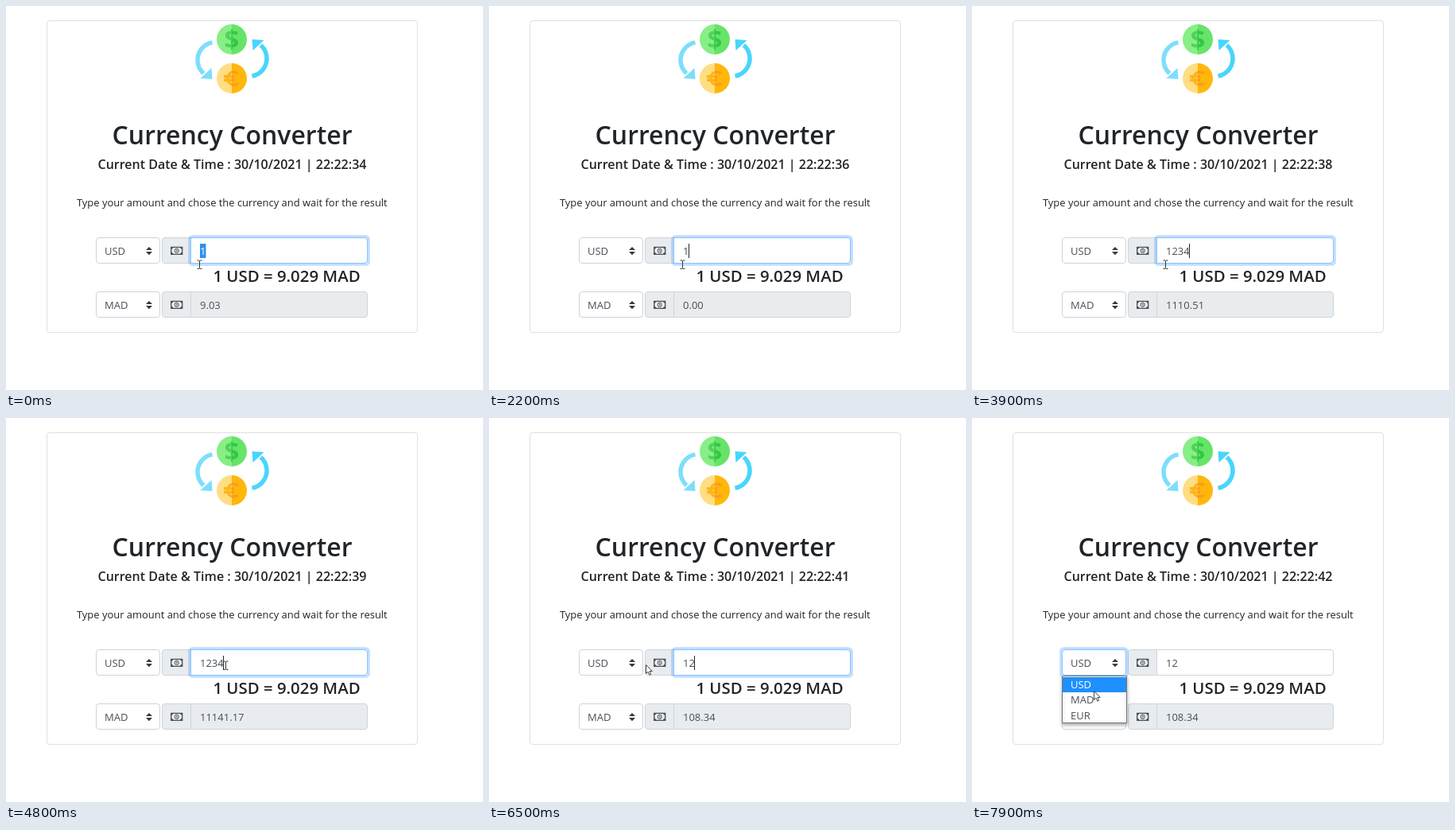
Recreate the animation shown at these times as an HTML page with a canvas. Size 600 px wide and 483 px high, loop 8 s.

```html
<!DOCTYPE html>
<html lang="en">
<head>
<meta charset="utf-8">
<title>Currency Converter</title>
<style>
  html, body { margin: 0; width: 600px; height: 483px; overflow: hidden; background: #fff; }
  canvas { display: block; }
</style>
</head>
<body>
<canvas id="stage" width="600" height="483"></canvas>
<script>
const ctx = document.getElementById('stage').getContext('2d');
const LOOP = 8000, RATE = 9.0285, REPLY_DELAY = 400, BLINK = 530;
const INK = '#212529', FIELD = '#495057', BORDER = '#ced4da', GREY = '#e9ecef';

const CLEAR = 1300, DRAG = 4700, RETYPE = 6100, BLUR = 7400, OPEN = 7500;
const presses = [2200, 3300, 3500, 3900];
// Pointer moves: start, end, and where they lead.
const glides = [[4300, DRAG, 280, 311], [DRAG, 5500, 197, 310], [6900, BLUR, 155, 318], [OPEN, 7900, 153, 343]];

const clamp = v => Math.max(0, Math.min(1, v));
const ease = k => k * k * (3 - 2 * k);

function typedAt(t) {
  if (t < CLEAR) return '1';
  if (t >= RETYPE) return '12';
  return '1234'.slice(0, presses.filter(p => p <= t).length);
}

function mouseAt(t) {
  return glides.reduce(([x, y], [start, end, toX, toY]) => {
    const k = ease(clamp((t - start) / (end - start)));
    return [x + (toX - x) * k, y + (toY - y) * k];
  }, [243, 325]);
}

// The caret blinks from the latest key press or click.
function caretShown(t) {
  const last = Math.max(...[CLEAR, ...presses, DRAG, RETYPE].filter(e => e <= t));
  return t < BLUR && Math.floor((t - last) / BLINK) % 2 === 0;
}

function text(str, x, y, { size = 13, weight = 400, color = FIELD, align = 'left' } = {}) {
  ctx.font = `${weight} ${size}px "Open Sans", "Noto Sans", sans-serif`;
  ctx.textAlign = align;
  ctx.fillStyle = color;
  ctx.fillText(str, x, y);
}

function box(x, y, w, h, fill, radii = 3.5, stroke = BORDER) {
  ctx.beginPath();
  ctx.roundRect(x + .5, y + .5, w, h, radii);
  ctx.fillStyle = fill;
  ctx.fill();
  ctx.lineWidth = 1;
  ctx.strokeStyle = stroke;
  ctx.stroke();
}

function focusRing(x, y, w, h, radii, amount) {
  if (!amount) return;
  ctx.save();
  ctx.globalAlpha = amount;
  box(x, y, w, h, 'transparent', radii, '#8cc3ff');
  ctx.globalAlpha = amount * amount * .25;
  ctx.beginPath();
  ctx.roundRect(x - 1.4, y - 1.4, w + 3.8, h + 3.8, 4);
  ctx.lineWidth = 2.8;
  ctx.strokeStyle = '#007bff';
  ctx.stroke();
  ctx.restore();
}

function path(d, x, y, fill, stroke, width = 1) {
  const p = new Path2D(d);
  ctx.save();
  ctx.translate(x, y);
  if (fill) { ctx.fillStyle = fill; ctx.fill(p); }
  if (stroke) { ctx.strokeStyle = stroke; ctx.lineWidth = width; ctx.stroke(p); }
  ctx.restore();
}

// Hard two-tone fill that changes at the given x.
function split(left, right, x) {
  const g = ctx.createLinearGradient(x - 20, 0, x + 20, 0);
  [[0, left], [.5, left], [.5, right], [1, right]].forEach(stop => g.addColorStop(...stop));
  return g;
}

function coin(y, left, right) {
  ctx.beginPath();
  ctx.arc(284, y, 19, 0, Math.PI * 2);
  ctx.fillStyle = split(left, right, 284);
  ctx.fill();
}

function swapArrow(color, angle) {
  ctx.save();
  ctx.translate(284.5, 67);
  ctx.rotate(angle);
  ctx.beginPath();
  ctx.arc(-21, 1, 22.5, -1.75, 2.3, true);
  ctx.lineWidth = 5.5;
  ctx.strokeStyle = color;
  ctx.stroke();
  path('M-40 24L-25 25L-26 11Z', 0, 0, color);
  ctx.restore();
}

function icon() {
  swapArrow('#7ddefb', 0);
  swapArrow('#48d5fd', Math.PI);
  coin(42, '#88ee86', '#66e468');
  text('$', 284, 54, { size: 33, weight: 700, color: split('#4fd35a', '#33c747', 284), align: 'center' });
  coin(91, '#ffdd83', '#ffb70a');
  path('M7 -6A8 8 0 1 0 7 6M-11 -2.3H2M-11 2.3H2', 285, 91, null, split('#ffb41a', '#ff9a20', -1), 3.6);
}

function select(y, label) {
  box(113, y, 80, 32, '#fff');
  text(label, 124, y + 22);
  path('M0 -5L-4 -.9H4ZM0 5.2L-4 1.1H4Z', 180, y + 17, '#343a40');
}

function moneyField(y, fill) {
  box(196, y, 36, 32, GREY, [3.5, 0, 0, 3.5]);
  box(232, y, 222, 32, fill, [0, 3.5, 3.5, 0]);
  path('M-7 -4.5H7V4.5H-7ZM-7 -2L-4.5 -4.5M7 -2L4.5 -4.5M-7 2L-4.5 4.5M7 2L4.5 4.5', 214.7, y + 16.8, null, FIELD, 1.3);
  path('M0 -2.8A2.5 2.8 0 1 1 0 2.8A2.5 2.8 0 1 1 0 -2.8M-.8 -1H.2V1.5', 214.7, y + 16.8, null, FIELD);
}

function amountText(t, mouseX) {
  const value = typedAt(t), left = 244;
  if (value) text(value, left, 313);
  else text('Type the amount of your current', left, 313, { color: '#6c757d' });

  const end = left + ctx.measureText(value).width;
  const selecting = t < CLEAR || t >= DRAG && t < RETYPE;
  const from = Math.round(clamp((mouseX - left) / (end - left)) * value.length);
  if (selecting && from < value.length) {
    const start = left + ctx.measureText(value.slice(0, from)).width;
    ctx.fillStyle = '#2f8fee';
    ctx.fillRect(start, 299, end - start, 18);
    text(value.slice(from), start, 313, { color: '#fff' });
  } else if (caretShown(t)) {
    ctx.fillStyle = INK;
    ctx.fillRect(Math.floor(end), 299, 1, 18);
  }
}

function dropdown() {
  ctx.save();
  ctx.shadowColor = 'rgba(0,0,0,.3)';
  ctx.shadowBlur = 4;
  ctx.shadowOffsetY = 2;
  box(113, 324, 81, 59, '#fff', 0, '#767676');
  ctx.restore();
  ctx.fillStyle = '#1e90ff';
  ctx.fillRect(114, 326, 80, 19);
  ['USD', 'MAD', 'EUR'].forEach((name, i) =>
    text(name, 124, 340 + Math.round(i * 19.3), { color: i ? FIELD : '#fff' }));
}

// An I-beam over the amount, an arrow elsewhere.
function pointer(x, y) {
  if (x >= 232) path('M-2.5 -5H-.5L.5 -4.5L1.5 -5H3.5M.5 -4.5V5M-2.5 5.5H-.5L.5 5L1.5 5.5H3.5', x, y, null, '#333');
  else path('M.5 .5V11.5L3 9.2L4.8 13.2L6.6 12.4L4.9 8.5H8.3Z', x, y, '#fff', '#444');
}

function draw(t) {
  const [mouseX, mouseY] = mouseAt(t).map(Math.round);
  const heading = { weight: 600, color: INK, align: 'center' };
  const seconds = 34 + Math.floor((t + 600) / 1000);
  const reply = typedAt(t - REPLY_DELAY) * RATE;

  ctx.fillStyle = '#fff';
  ctx.fillRect(0, 0, 600, 483);
  box(51, 18, 466, 392, '#fff', 3.5, '#e0e0e0');
  icon();

  text('Currency Converter', 284.5, 174, { ...heading, size: 32 });
  text(`Current Date & Time : 30/10/2021 | 22:22:${seconds}`, 284.5, 205, { ...heading, size: 16.05 });
  text('Type your amount and chose the currency and wait for the result', 284.3, 252,
    { size: 12.95, color: INK, align: 'center' });
  text('1 USD = 9.029 MAD', 353, 347, { ...heading, size: 20.4 });

  select(291, 'USD');
  select(359, 'MAD');
  moneyField(291, '#fff');
  moneyField(359, GREY);
  focusRing(232, 291, 222, 32, [0, 3.5, 3.5, 0], clamp((BLUR + 30 - t) / 120));
  focusRing(113, 291, 80, 32, 3.5, clamp((t - BLUR) / 150));
  amountText(t, mouseX);
  text(reply.toFixed(2), 244, 381);

  if (t >= OPEN) dropdown();
  pointer(mouseX, mouseY);
}

// The screen updates in steps of 100 ms.
function tick() {
  draw(Math.floor(performance.now() % LOOP / 100) * 100);
  requestAnimationFrame(tick);
}
tick();
</script>
</body>
</html>
```
